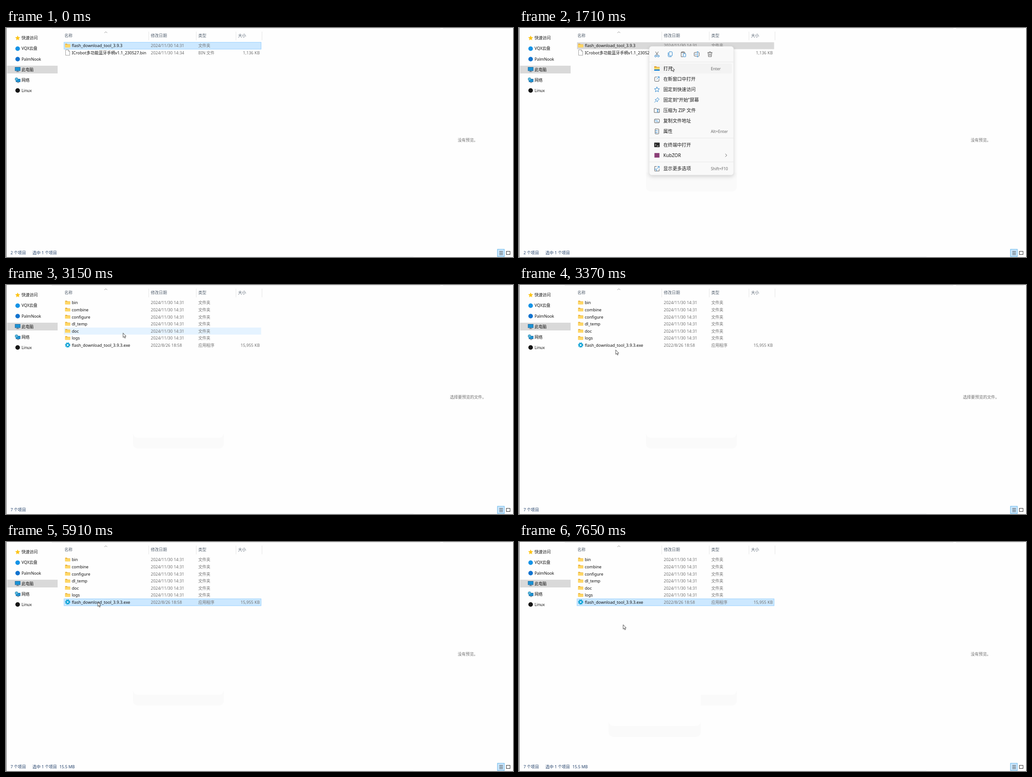
These frames come from a looping animation (1110x504 px, 8 s). An HTML page:

```html
<!DOCTYPE html>
<html>
<head>
<meta charset="utf-8">
<title>File manager</title>
<style>
  html, body { margin: 0; width: 100%; height: 100%; overflow: hidden; background: #fefefe; }
  svg { display: block; width: 1110px; height: 504px; }
  text { font: 9px "Noto Sans", "Noto Sans CJK SC", "Noto Sans CJK", sans-serif; fill: #111; white-space: pre; }
  .small { font-size: 8.8px; }
  .grey { fill: #707070; }
  .head { fill: #53606f; }
  .status { font-size: 8.8px; fill: #1d3c66; }
  .item { font-size: 10.1px; fill: #1b1b1b; }
  .key { font-size: 8.6px; fill: #666; }
  .line { fill: none; stroke: #4a4a4a; stroke-width: .9; stroke-linejoin: round; stroke-linecap: round; }
  .blue { stroke: #1279c9; }
  .panel { filter: drop-shadow(0 3px 4px rgba(0, 0, 0, .16)); }
</style>
</head>
<body>
<svg viewBox="0 0 1110 504">
  <defs>
    <clipPath id="reveal"><rect id="revealBox" x="-15" y="-10" width="220" height="320"/></clipPath>
    <g id="folder">
      <path d="M-5.5-4h4l1.3 1.4h5.7v6.6h-11z" fill="#e9b23c"/>
      <path d="M-5.5-1.7h11v5.2q0 .7-.7.7h-9.6q-.7 0-.7-.7z" fill="#ffd766"/>
    </g>
    <g id="page">
      <path d="M-4.5-6h6l3 3v9h-9z" fill="#fff" stroke="#858585" stroke-width=".8"/>
      <path d="M1.5-6v3h3" fill="none" stroke="#858585" stroke-width=".8"/>
    </g>
    <g id="gear">
      <circle r="4.8" fill="none" stroke="#12a4d6" stroke-width="2" stroke-dasharray="2.1 1.67"/>
      <circle r="3.2" fill="none" stroke="#12a4d6" stroke-width="2.6"/>
    </g>
    <path id="star" d="M0-5.5 1.6-1.9 5.5-1.6 2.6 1 3.4 5 0 2.9-3.4 5-2.6 1-5.5-1.6-1.6-1.9z"/>

    <g id="cut" class="line"><path d="M-3-5.5 2 2.2M3-5.5-2 2.2"/><g class="blue"><circle cx="-3" cy="4" r="2"/><circle cx="3" cy="4" r="2"/></g></g>
    <g id="copy" class="line blue"><rect x="-2.5" y="-5.5" width="7" height="9" rx="1.4"/><path d="M-4.5-3.5v7q0 2 2 2h5"/></g>
    <g id="paste" class="line"><path d="M-1 5.5h-4v-10h2M3-1.5v-3h-2M-3-5.5h4v2h-4z"/><rect class="blue" x="-.5" y="-1.5" width="5.5" height="7" rx="1"/></g>
    <g id="rename" class="line"><path d="M0-4h-4.5q-1 0-1 1v6q0 1 1 1h4.5M4-4h.5q1 0 1 1v6q0 1-1 1h-.5"/><path class="blue" d="M2-5.5v11M.5-5.5h3M.5 5.5h3M-3.5 0h3.5"/></g>
    <g id="share" class="line"><path d="M-1-4h-3.5v9h9v-2"/><path class="blue" d="M-2 2q0-4 4-4v-3l3.5 4-3.5 4v-2.7q-2.500-.2-4 1.700z"/></g>
    <g id="bin" class="line"><path d="M-5-3.700h10M-2-3.700q0-2 2-2t2 2M-4-3.700l.8 9h6.400l.8-9M-1.200-1v4M1.200-1v4"/></g>

    <g id="open"><path d="M-6-5h4.500l1.300 1.500h6.200v8h-12z" fill="#e3a22b"/><path d="M-6-2h12v4h-12z" fill="#ffdc70"/><path d="M-6 2h12v2.800h-12z" fill="#1b83d2"/></g>
    <g id="window" class="line"><path d="M-.5-4.500h-3q-1.500 0-1.500 1.500v6.500q0 1.500 1.500 1.500h6.500q1.500 0 1.500-1.500v-3"/><path class="blue" d="M-.5.5 5-5M1.500-5h3.500v3.500"/></g>
    <g id="fav" class="line blue"><use href="#star"/></g>
    <g id="pin" class="line blue"><path d="M1.500-5 5-1.500 3.500-.5 1.500 1.500 1 4-4-1l2.500-.5 2-2zM-1.700 1.700-5.200 5.200"/></g>
    <g id="zip" class="line"><path d="M-5.500-4.500h4l1.300 1.500h5.700v7.500h-11z"/><path class="blue" d="M2-3v7.500M0-1h2M0 2h2"/></g>
    <g id="path" class="line"><rect x="-5.500" y="-4" width="11" height="8" rx="1.500"/><path class="blue" d="M-3.500-2-1.500 2M-.5-2 1.500 2M3 2h.5"/></g>
    <g id="props" class="line"><rect x="-4" y="-5.500" width="8" height="11" rx="1.200"/><path class="blue" d="M-2-2h1v1h-1zM-2 2h1v1h-1zM1-1.500h1M1 2.500h1"/></g>
    <g id="shell"><rect x="-6" y="-5" width="12" height="10" rx="1" fill="#2b2b2b"/><path d="M-4-2l2 2-2 2M0 2.500h3.500" fill="none" stroke="#fff"/></g>
    <rect id="pack" x="-5.500" y="-5" width="11" height="10" fill="#8b3f77"/>
    <g id="more" class="line"><path d="M-1-5h-4v10h10v-4"/><path class="blue" d="M0 0l5-5M1.500-5h3.500v3.500M-5 1h4v4"/></g>
    <g id="shield"><path d="M0-5.500q2.500 1.500 5 1.500 0 7-5 9.500-5-2.500-5-9.500 2.500 0 5-1.500z" fill="#1b83d2"/><path d="M0-5.500q2.500 1.500 5 1.500 0 2-.5 4h-4.500zM0 0v5.500q-3.500-2-4.500-5.500z" fill="#f6c73b"/></g>
  </defs>

  <rect width="1110" height="504" fill="#fefefe"/>
  <path d="M.5 0v504" stroke="#5a5a5a"/>
  <path d="M100 .5h851M957 .5h148" stroke="#dedede"/>
  <path d="M112 503.500h780" stroke="#eef1f6"/>
  <g id="ghosts"></g>

  <rect x="2" y="83" width="111" height="17" fill="#d9d9d9"/>
  <use href="#star" x="25.500" y="22" fill="#fcc419"/>
  <circle cx="25.500" cy="45.500" r="5" fill="#1593e6"/>
  <circle cx="25.500" cy="68.500" r="5" fill="#1273cf"/>
  <g transform="translate(25.500 91)"><rect x="-5.500" y="-4.500" width="11" height="7.500" fill="#1a93d6" stroke="#20689a"/><path d="M-3 5h6M0 3v2" stroke="#456"/></g>
  <g transform="translate(25.500 114.500)"><rect x="-3.500" y="-2" width="9" height="6" fill="#1a93d6" stroke="#20689a"/><path d="M-1 5.700h4" stroke="#456"/><circle cx="-2.500" cy="-2" r="3.200" fill="#58b7de" stroke="#25779f" stroke-width=".7"/></g>
  <circle cx="25.500" cy="137.500" r="5" fill="#161616"/>
  <g id="nav"></g>

  <path d="M312.500 8v19M416.500 8v19M503.500 8v19M560.500 8v19" stroke="#e6e6e6"/>
  <path d="M215.500 11l3-3 3 3" fill="none" stroke="#777" stroke-width=".8"/>
  <g id="heads"></g>

  <rect id="hover" x="127" width="431.500" height="15.600" fill="#e5f3ff"/>
  <rect id="pick" x="127" width="431.500" height="15.200"/>
  <g id="outer"></g>
  <g id="inner"></g>
  <g id="foot"></g>

  <rect x="1076" y="487" width="15" height="16" fill="#cce8ff" stroke="#5fb2e6"/>
  <path d="M1080 491.500h8M1080 494h8M1080 496.500h8M1080 499h8" stroke="#444" stroke-width=".9"/>
  <rect x="1095.500" y="491.500" width="8" height="7" fill="#fff" stroke="#333"/>

  <g id="menus"></g>
  <path id="arrow" d="M0 0V9.700L2.200 7.700 3.700 11.300 5.300 10.600 3.800 7.200H6.700z" fill="#fff" stroke="#222" stroke-width=".8"/>
  <g id="ring" fill="none" stroke-width="2.600"><circle r="5.300" stroke="#7cc5f2"/><path d="M0-5.300A5.300 5.300 0 0 1 5.300 0" stroke="#0b63b5"/></g>
</svg>

<script>
const $ = id => document.getElementById(id);
const LOOP = 8000, TOP = 31.2, ROW = 15.6;
const text = (x, cy, s, cls = '', extra = '') =>
  `<text x="${x}" y="${cy + 3.3}" class="${cls}" ${extra}>${s}</text>`;
const use = (id, x, y) => `<use href="#${id}" x="${x}" y="${y}"/>`;

$('nav').innerHTML = ['快速访问', 'VQX云盘', 'PalmNook', '此电脑', '网络', 'Linux']
  .map((s, i) => text(34, 22 + i * 23.1, s, 'small')).join('');
$('heads').innerHTML = [[128, '名称'], [317, '修改日期'], [421, '类型'], [508, '大小']]
  .map(([x, s]) => text(x, 17, s, 'head small')).join('');

function fileRow([icon, name, date, type, size = ''], i) {
  const y = TOP + ROW * (i + .5);
  return use(icon, 135, y - .5) + text(144, y, name) + text(317, y, date, 'grey') +
    text(421, y, type, 'grey small') + text(555.5, y, size, 'grey', 'text-anchor="end"');
}
const day = '2024/11/30 14:31';
$('outer').innerHTML = [
  ['folder', 'flash_download_tool_3.9.3', day, '文件夹'],
  ['page', 'ICrobot多功能蓝牙手柄v1.1_230527.bin', '2024/11/30 14:34', 'BIN 文件', '1,136 KB']
].map(fileRow).join('');
$('inner').innerHTML = [
  ...['bin', 'combine', 'configure', 'dl_temp', 'doc', 'logs'].map(s => ['folder', s, day, '文件夹']),
  ['gear', 'flash_download_tool_3.9.3.exe', '2022/8/26 18:58', '应用程序', '15,955 KB']
].map(fileRow).join('');

const note = (id, x, y, s, cls) => `<g id="${id}">${text(x, y, s, cls)}</g>`;
$('foot').innerHTML = note('two', 10, 495, '2 个项目', 'status') + note('seven', 10, 495, '7 个项目', 'status') +
  note('chosen', 58, 495, '选中 1 个项目', 'status') + note('bytes', 117, 495, '15.5 MB', 'status') +
  note('noView', 989, 247, '没有预览。', 'grey small') + note('askView', 972, 247, '选择要预览的文件。', 'grey small');

function menu(id, x, y, tools, groups) {
  let cy = 49, body = '', rules = '<path d="M0 34.500h185';
  groups.forEach((group, g) => {
    if (g) { rules += `M0 ${cy - 8.500}h185`; cy += 6.5; }
    for (const [icon, label, key] of group) {
      body += use(icon, 17, cy) + text(31, cy + .4, label, 'item');
      if (key === '>') body += `<path class="line" d="M167 ${cy - 3}l3 3-3 3"/>`;
      else if (key) body += text(135, cy, key, 'key');
      cy += 23.05;
    }
  });
  const h = cy - 9;
  return `<g id="${id}" transform="translate(${x} ${y})"><g clip-path="url(#reveal)">
    <rect class="panel" width="185" height="${h}" rx="6" fill="#f9f9f9" stroke="#e4e4e4" stroke-width=".7"/>
    ${rules}" stroke="#e8e8e8"/><rect id="${id}Hot" x="4" y="38" width="177" height="22" rx="3" fill="#f3f3f3"/>
    ${tools.map((t, i) => use(t, 17 + i * 29, 17.500)).join('')}${body}</g></g>`;
}
const openItem = ['open', '打开', 'Enter'], pinItem = ['pin', '固定到“开始”屏幕'];
const common = [['zip', '压缩为 ZIP 文件'], ['path', '复制文件地址'], ['props', '属性', 'Alt+Enter']];
const packItem = ['pack', 'KubZOR', '>'], moreItem = ['more', '显示更多选项', 'Shift+F10'];
$('menus').innerHTML =
  menu('menuA', 285, 40.3, ['cut', 'copy', 'paste', 'rename', 'bin'], [
    [openItem, ['window', '在新窗口中打开'], ['fav', '固定到快速访问'], pinItem, ...common],
    [['shell', '在终端中打开'], packItem], [moreItem]]) +
  menu('menuB', 204.500, 132.300, ['cut', 'copy', 'rename', 'share', 'bin'], [
    [openItem, ['shield', '以管理员身份运行'], pinItem, ['pin', '固定到任务栏'], ...common],
    [packItem], [moreItem]]);

// Faint panels left where the menu shadows were.
const ghost = (id, x, w, top, mid, end) => {
  const box = (bottom, fill) => `M${x} ${top}h${w}V${bottom - 13}q0 13-13 13h${26 - w}q-13 0-13-13z" fill="${fill}"/>`;
  return `<g id="${id}"><path d="${box(end, '#fafafa')}<path id="${id}Gap" d="${box(mid, '#fefefe')}</g>`;
};
$('ghosts').innerHTML = ghost('ghostA', 278, 199, 318, 336.5, 360) + ghost('ghostB', 196, 202, 180, 405, 429);

// time, x, y of the pointer tip
const track = [
  [50, 736, -2], [180, 590, 28], [310, 450, 46], [440, 328, 52], [580, 282, 40],
  [1450, 282, 40], [1710, 334, 85], [2510, 334, 85], [2750, 322, 50], [2980, 279, 84],
  [3150, 256.500, 105.500], [3270, 232, 125], [3400, 206, 148], [3500, 199, 131],
  [3650, 199, 131], [3700, 201, 132], [6400, 201, 132], [6710, 228, 182]
];
function pointer(t) {
  const i = track.findIndex(k => k[0] > t);
  if (i < 0) return track[track.length - 1].slice(1);
  if (i === 0) return null;
  const [t0, x0, y0] = track[i - 1], [t1, x1, y1] = track[i], p = (t - t0) / (t1 - t0);
  return [x0 + (x1 - x0) * p, y0 + (y1 - y0) * p];
}
const show = (id, on) => $(id).setAttribute('visibility', on ? 'inherit' : 'hidden');

function draw(t) {
  const within = (a, b) => t >= a && t < b;
  const menuA = within(1330, 1970), menuB = within(6170, 7420);
  const inside = t >= 2150, chosen = !inside || t >= 3960;
  const busy = within(1040, 1100) || within(4860, 5910);
  const at = pointer(t), pick = inside ? 6 : 0;

  show('outer', !inside); show('inner', inside);
  show('two', !inside); show('seven', inside);
  show('chosen', chosen); show('bytes', inside && chosen);
  show('noView', chosen); show('askView', !chosen);

  const faded = menuA || (menuB && t >= 6370);
  show('pick', chosen);
  $('pick').setAttribute('y', TOP + ROW * pick + .2);
  $('pick').setAttribute('fill', faded ? '#d9d9d9' : '#cce8ff');
  $('pick').setAttribute('stroke', faded ? 'none' : '#99d1ff');

  const row = at ? Math.floor((at[1] - TOP) / ROW) : -1;
  const hovered = at && !menuA && !menuB && row >= 0 && row < (inside ? 7 : 2) &&
    at[0] > 127 && at[0] < 558 && !(chosen && row === pick);
  show('hover', hovered);
  if (hovered) $('hover').setAttribute('y', TOP + ROW * row);

  show('menuA', menuA); show('menuB', menuB);
  show('menuAHot', menuA && at[1] > 78); show('menuBHot', menuB && at[1] > 170);
  const p = Math.min(1, (t - (menuB ? 6170 : 1330)) / 150);
  if (menuA || menuB) $('revealBox').setAttribute('height', 320 * (1 - .6 * (1 - p) ** 2));
  show('ghostA', t >= 1450); show('ghostAGap', t >= 1970);
  show('ghostB', t >= 6220); show('ghostBGap', t >= 7420);

  show('arrow', at && !busy); show('ring', at && busy);
  if (at) for (const id of ['arrow', 'ring']) $(id).setAttribute('transform', `translate(${at[0]} ${at[1]})`);
}

const start = performance.now();
function frame() {
  draw((performance.now() - start) % LOOP);
  requestAnimationFrame(frame);
}
frame();
</script>
</body>
</html>
```
